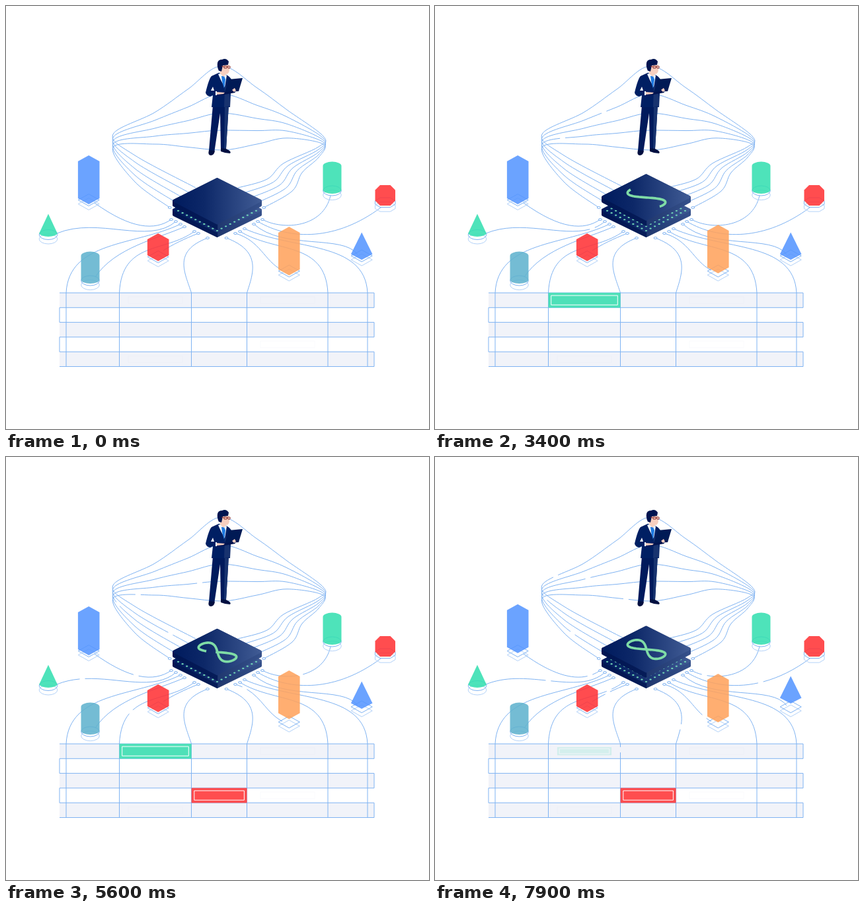
Animation of 640x640 px, one loop 8 s. Source, as an HTML page:

```html
<!DOCTYPE html>
<html lang="en">
<head>
<meta charset="utf-8">
<title>Data chip</title>
<style>
  html, body { margin: 0; width: 100%; height: 100%; overflow: hidden; background: #fff; }
  svg { display: block; width: 100%; height: 100%; }
  .line { fill: none; stroke: #7fb3f2; stroke-width: 1; }
  .pale { fill: none; stroke: #b3d2f8; stroke-width: 1; }
  .port { fill: #fff; stroke: #7fb3f2; stroke-width: 1; }
  .solid { opacity: .87; }
</style>
</head>
<body>
<svg viewBox="0 0 640 640">
  <defs>
    <linearGradient id="face"><stop stop-color="#001b5e"/><stop offset=".35" stop-color="#0d2868"/><stop offset="1" stop-color="#405b94"/></linearGradient>
    <linearGradient id="side"><stop stop-color="#001552"/><stop offset=".5" stop-color="#061c58"/><stop offset=".51" stop-color="#20386f"/><stop offset="1" stop-color="#35508a"/></linearGradient>
  </defs>

  <g id="table"></g>
  <g id="lines"></g>
  <g id="cells"></g>
  <g id="shapes"></g>

  <g id="man">
    <path fill="#001a5c" d="M313 150L307 219H315.500L324 162L325 216H333L337 150Z"/>
    <path fill="#18336f" d="M331 152L330 216H333L337 150Z"/>
    <path fill="#000f40" d="M307 218Q305 226 310 226Q315 226 316 219ZM325 215V220Q332 223 339 223Q342 220 333 216Z"/>
    <path fill="#001f63" d="M322 101L311 106Q307 110 302 131Q303 136 309 137L313 135L311 153H339L341 111Q338 106 333 104Z"/>
    <path fill="#f3f8ff" d="M321 103L327 101L334 105L331 123L325 112Z"/>
    <path fill="#1c78e0" d="M326 106H330L332 111L330 125L327 114Z"/>
    <path fill="#18336f" d="M331 124L338 116L339 152L330 153Z"/>
    <path fill="#fff" d="M313 122L310 128H315Z"/>
    <path fill="#f7cfc0" d="M325 89H337L338 95Q338 103 333 103L329 107L324 102Z"/>
    <path fill="#001450" d="M320 86Q321 81 327 81Q333 78 337 84L336 89L328 90L326 99L322 98Q319 92 320 86Z"/>
    <path fill="none" stroke="#8d2f2c" d="M326 91L330 92M330 91H334V94H330ZM335 91H339V94H336Z"/>
    <path fill="#001a55" d="M337 111L358 109L352 129L331 130Z"/>
    <path fill="#001450" d="M318 132L346 128L347 131L325 135Z"/>
    <path fill="#f7cfc0" d="M318 130L331 131L329 133L319 134ZM342 127L346 124L348 128L345 130Z"/>
    <path fill="#fff" d="M317 129H319V135H317Z"/>
  </g>

  <g stroke-linejoin="round" stroke-width="4">
    <path fill="url(#side)" stroke="url(#side)" d="M254 309V316L319.500 348L385 316V309L319.500 277Z"/>
    <path fill="url(#face)" stroke="url(#face)" d="M254 308.500L319.500 275L385 308.500L319.500 341Z"/>
    <g id="pins" fill="#72d6b6" stroke="none"></g>
  </g>
  <g id="lid" stroke-linejoin="round" stroke-width="4">
    <path fill="url(#side)" stroke="url(#side)" d="M254 295V301.500L319.500 336.500L385 301.500V295L319.500 262Z"/>
    <path fill="url(#face)" stroke="url(#face)" d="M254.500 294.500L319.500 262.200L384.500 294.500L319.500 328.500Z"/>
    <path id="loop" fill="none" stroke="#7fdca6" stroke-width="3.700" pathLength="1"/>
  </g>
</svg>
<script>
const LOOP = 8000, TRAVEL = 3300, GAP = 8, ROW = 22.3, TOP = 434;
const $ = id => document.getElementById(id);

function add(parent, tag, attrs) {
  const el = document.createElementNS('http://www.w3.org/2000/svg', tag);
  for (const key in attrs) el.setAttribute(key, attrs[key]);
  return parent.appendChild(el);
}

// Smooth curve through points, leaving the first one horizontally
function curve(p) {
  let d = `M${p[0]}`;
  for (let i = 0; i < p.length - 1; i++) {
    const b = p[i], c = p[i + 1], e = p[i + 2] || c;
    const a = p[i - 1] || [2 * b[0] - c[0], c[1]];
    const c1 = [0, 1].map(k => b[k] + (c[k] - a[k]) / 6);
    const c2 = [0, 1].map(k => c[k] - (e[k] - b[k]) / 6);
    d += `C${c1} ${c2} ${c}`;
  }
  return d;
}

const pulses = [];
function wire(d, start) {
  const el = add($('lines'), 'path', { class: 'line', d });
  if (start) pulses.push({ el, start, length: el.getTotalLength() });
}
function port(cx, cy) {
  add($('lines'), 'ellipse', { class: 'port', cx, cy, rx: 2.5, ry: 1.5 });
}

// Table: shaded rows, faint empty cells, one snaking outline
let snake = `M81 ${TOP}`;
for (let row = 0; row < 6; row++) {
  const y = TOP + row * ROW;
  if (row % 2 === 0 && row < 5) add($('table'), 'rect', { x: 81, y, width: 476, height: ROW, fill: '#f1f3f9' });
  snake += row % 2 ? `V${y}H81` : `V${y}H557`;
}
[[225, 0], [425, 0], [425, 3], [225, 4]].forEach(([x, row]) => add($('table'), 'rect', {
  x: x - 40, y: TOP + row * ROW + 6, width: 82, height: 10, fill: 'none', stroke: row === 3 ? '#fafbfd' : '#edf0f7'
}));
add($('table'), 'path', { class: 'line', d: snake });

// Five lines fan out from the man and wrap round to the chip on both sides
[6290, 2630, 3570, 1940, 4185].forEach((start, i) => {
  const top = [91, 133, 162, 188, 218][i];
  const left = 161 + 12 * i, right = 157 + 10.7 * i;
  const endX = 40 - 0.2 * i + 10 * i - 8, endY = 275 + 7.5 * i;
  wire(curve([[326, top], [275, (top + left) / 2], [225, left], [162, 194 + 5 * i],
    [195, 226 + 10 * i], [319 - endX, endY]]), start);
  wire(curve([[326, top], [380, (top + right) / 2], [425, right], [480, 197 + 3 * i], [473, 213 + 4 * i],
    [420 + 7 * i, 238 + 3.5 * i], [395 + 9.5 * i, 262 + 4.5 * i], [319 + endX, endY]]));
  if (i > 2) [-1, 1].forEach(side => port(319 + side * endX, endY));
});

// Chip to table columns
function column(x, y, col, start) {
  const side = Math.sign(col - x);
  wire(`M${x} ${y}C${x + 0.4 * (col - x)} ${y + 33} ${col - 4 * side} 355 ${col} ${TOP}V545`, start);
  port(x, y);
}
column(264, 330, 91);
column(285, 341, 171.5, 4300);
column(361, 337, 547);
column(354, 341, 487);
[[-1, 305, 280.5, 6180], [1, 333.5, 364.5, 6720]].forEach(([side, x, col, start]) => {
  wire(`M${x} 351C${x + side * 53} 371 ${col + side * 10} 403 ${col} ${TOP}V545`, start);
  port(x, 351);
});

// Chip to floating shapes
function link(x, y, bend, start) {
  wire(`M${x} ${y}C${bend}`, start);
  port(x, y);
}
link(250, 323, '225 340 190 338 134 298', 4150);
link(257, 326, '215 362 140 318 77 344', 3010);
link(270, 334, '230 352 165 365 135 410');
link(291, 344, '270 352 250 362 238 370', 6100);
link(388, 323, '420 340 480 335 491 287', 4050);
link(381, 326, '430 355 500 355 567 305', 5980);
link(375, 330, '420 370 510 345 532 376');
link(347, 344, '385 355 390 385 418 400', 5060);

for (let i = 0; i < 10; i++)
  for (let j = 0; j < 10; j++)
    add($('pins'), 'ellipse', { cx: 319.5 + (i - j) * 6.55, cy: 340 - (i + j) * 3.35, rx: 1.7, ry: 1.1 });

// Figure eight lying in the plane of the lid
const eight = Array.from({ length: 97 }, (_, k) => {
  const s = Math.PI * (1 - k / 48), along = Math.cos(s), across = Math.sin(2 * s);
  return [320 + 24 * along + 9 * across, 295.5 + 12 * along - 4.5 * across];
});
$('loop').setAttribute('d', `M${eight.join('L')}Z`);

const floaters = [];
function solid(d, fill, start) {
  const el = add($('shapes'), 'path', { class: 'solid', d, fill });
  if (start) floaters.push({ el, start });
}
function outlines(d, x, y, drop) {
  add($('shapes'), 'path', { class: 'pale', d: `M${x} ${y + drop}${d}` });
  add($('shapes'), 'path', { class: 'line', d: `M${x} ${y}${d}` });
}
const diamonds = (x, y) => outlines('l16 -9l16 9l-16 9Z', x - 16, y, 6);
const rings = (x, y) => outlines('a13.800 7.500 0 0 1 27.600 0a13.800 7.500 0 0 1 -27.600 0Z', x - 13.8, y, 6.5);

function pillar(x, top, bottom, fill, start) {
  diamonds(x, bottom - 6.5);
  solid(`M${x} ${top}l16.300 9V${bottom - 9}l-16.300 9l-16.300 -9V${top + 9}Z`, fill, start);
}
function cylinder(x, top, bottom, fill) {
  rings(x, bottom - 4.5);
  solid(`M${x - 14} ${top + 6.5}a14 6.500 0 0 1 28 0V${bottom - 6}a14 6 0 0 1 -28 0Z`, fill);
}

const BLUE = '#5596ff', GREEN = '#34dfb0', RED = '#ff3235';
pillar(125.2, 226, 300, BLUE, 6480);
pillar(428.3, 334, 407.5, '#ffa25c', 2000);
pillar(230.2, 344, 386, RED);
cylinder(493.5, 235.5, 284, GREEN);
cylinder(127.5, 371.5, 420, '#60b2ce');
rings(64, 346);
solid('M64 314.500L77.800 344A14 6 0 0 1 50.200 344Z', GREEN);
outlines('h15.500l7.500 5v5l-7.500 4.500h-15.500l-7.500 -4.500v-5Z', 566, 290, 6.5);
solid('M566 271H581.500L589 278.500V294.500L581.500 302H566L558.500 294.500V278.500Z', RED);
diamonds(538.2, 378);
solid('M538.200 342.500L554.500 375.500L538.200 384L521.900 375.500Z', BLUE, 4200);

function cell(x, row, w, fill) {
  const g = add($('cells'), 'g', {}), h = 22.6, inset = 4.2;
  add(g, 'rect', { x: -w / 2, y: -h / 2, width: w, height: h, fill });
  add(g, 'rect', {
    x: inset - w / 2, y: inset - h / 2, width: w - 2 * inset, height: h - 2 * inset,
    fill: 'none', stroke: '#fff', 'vector-effect': 'non-scaling-stroke'
  });
  return amount => {
    const scale = `${0.7 + 0.3 * amount} ${0.45 + 0.55 * amount}`;
    g.setAttribute('transform', `translate(${x} ${TOP + (row + 0.5) * ROW}) scale(${scale})`);
    g.setAttribute('opacity', amount);
  };
}
const greenCell = cell(226, 0, 109, '#4ee0b8');
const redCell = cell(322.6, 3, 84, '#ff4d4f');

const clamp = v => Math.min(1, Math.max(0, v));
const ease = (t, start) => (1 - Math.cos(Math.PI * clamp((t - start) / 1200))) / 2;
function tween(t, ...stops) {
  let value = stops[0][1];
  for (let i = 1; i < stops.length; i++) {
    const [t0, v0] = stops[i - 1], [t1, v1] = stops[i];
    if (t >= t0) value = v0 + (v1 - v0) * clamp((t - t0) / (t1 - t0));
  }
  return value;
}

function draw() {
  const t = performance.now() % LOOP;

  for (const { el, start, length } of pulses) {
    const at = (t - start) % TRAVEL / TRAVEL * length;
    const from = Math.max(0, at - GAP / 2);
    el.setAttribute('stroke-dasharray', t < start ? 'none' : `${from} ${at + GAP / 2 - from} 2000`);
  }
  for (const { el, start } of floaters) {
    const turn = Math.max(0, t - start) / 8000 * 2 * Math.PI;
    el.setAttribute('transform', `translate(0 ${-5.6 * (1 - Math.cos(turn))})`);
  }
  const lift = 3 * Math.cos(2 * Math.PI * (t - 5950) / 6000) - 3;
  $('lid').setAttribute('transform', `translate(0 ${lift})`);

  const tail = tween(t, [2100, -0.08], [3400, 0], [4900, 0.25]);
  const head = tween(t, [2100, -0.08], [2400, 0.12], [3400, 0.57], [4900, 0.97], [6000, 1.25]);
  const span = head - tail;
  $('loop').setAttribute('visibility', span > 0 ? 'visible' : 'hidden');
  $('loop').setAttribute('stroke-dasharray', span > 0.999 ? 'none' : `${span} ${1 - span}`);
  $('loop').setAttribute('stroke-dashoffset', -tail);

  greenCell(ease(t, 2120) - ease(t, 7030));
  redCell(ease(t, 4126));
  requestAnimationFrame(draw);
}
draw();
</script>
</body>
</html>
```
